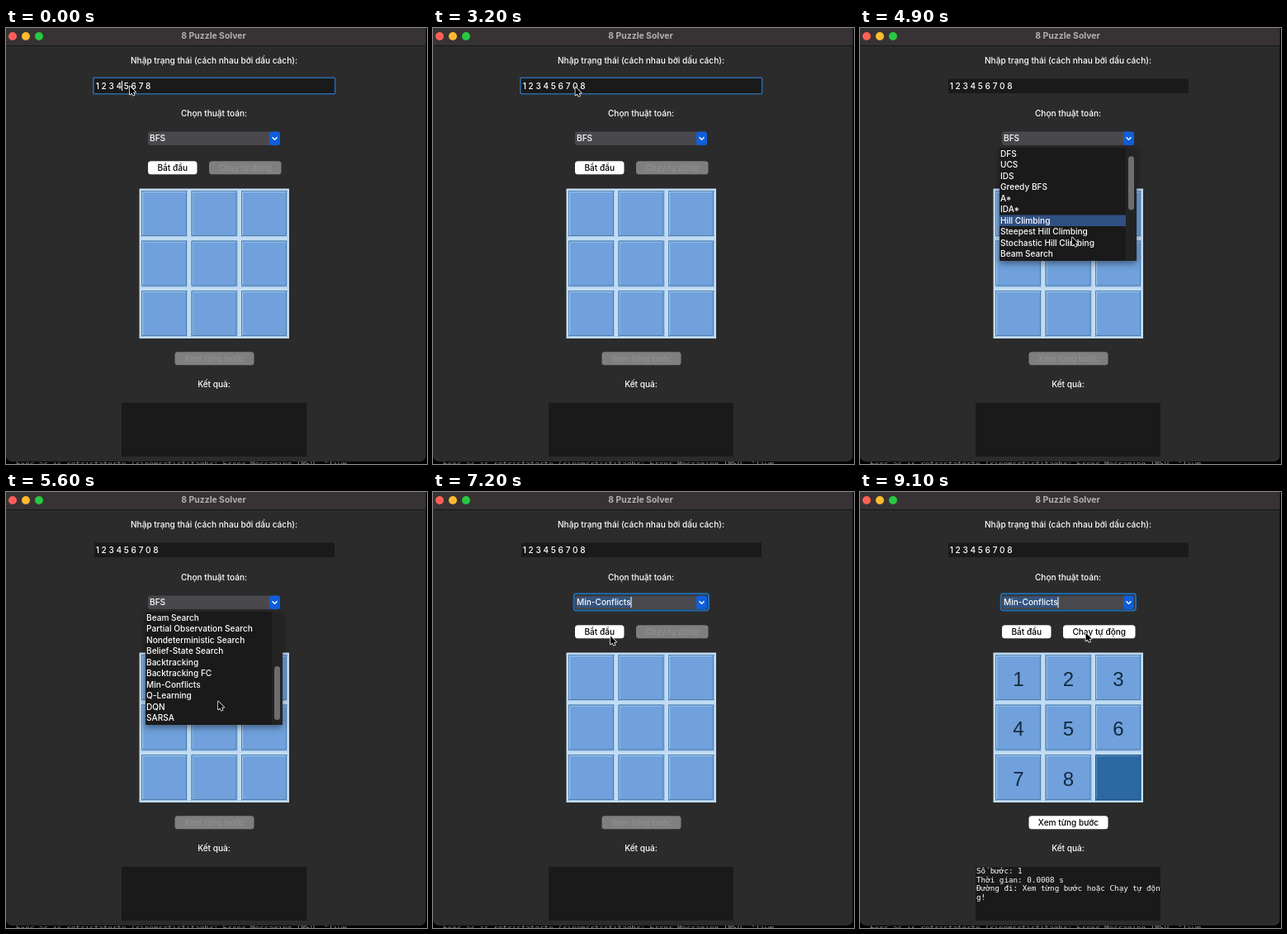
An HTML page with a canvas that plays this animation: 510x528 px, repeating every 9500 ms.

```html
<!DOCTYPE html>
<html lang="vi">
<head>
<meta charset="utf-8">
<title>8 Puzzle Solver</title>
<style>
html, body { margin: 0; width: 100%; height: 100%; overflow: hidden; background: #000; }
canvas { display: block; }
</style>
</head>
<body>
<canvas id="stage" width="510" height="528"></canvas>
<script>
const screen2d = document.getElementById('stage').getContext('2d');
const layer = document.createElement('canvas');
layer.width = 510;
layer.height = 528;
const layer2d = layer.getContext('2d');
let ctx = screen2d;

const UI = '500 10.1px Inter, sans-serif';
const MONO = '9.25px "DejaVu Sans Mono", monospace';
const LOOP = 9500;
const OPEN = 4100, CHOSEN = 6300, SOLVED = 7400, MOVED = 8300;

const algorithms = ['BFS', 'DFS', 'UCS', 'IDS', 'Greedy BFS', 'A*', 'IDA*', 'Hill Climbing',
  'Steepest Hill Climbing', 'Stochastic Hill Climbing', 'Beam Search',
  'Partial Observation Search', 'Nondeterministic Search', 'Belief-State Search',
  'Backtracking', 'Backtracking FC', 'Min-Conflicts', 'Q-Learning', 'DQN', 'SARSA'];
const report = ['Số bước: 1', 'Thời gian: 0.0008 s',
  'Đường đi: Xem từng bước hoặc Chạy tự độn', 'g!'];

// Pointer stops: time, x, y
const stops = [[0, 150, 70.5], [400, 150, 70.5], [1000, 171.5, 70.5], [1200, 172.5, 71.5],
  [3200, 172.5, 71.5], [3800, 327, 133.5], [4200, 327, 133.5], [4500, 257, 253.5],
  [5600, 257, 253.5], [6100, 239, 233.5], [6300, 239, 233.5], [7000, 215, 174.5],
  [7400, 215, 174.5], [8100, 273.5, 170.5], [LOOP, 273.5, 170.5]];

function pointerAt(t) {
  const i = stops.findIndex(s => s[0] > t);
  const [t0, x0, y0] = stops[i - 1], [t1, x1, y1] = stops[i];
  const p = (t - t0) / (t1 - t0), e = p * p * (3 - 2 * p);
  return [x0 + (x1 - x0) * e, y0 + (y1 - y0) * e];
}

function box(x, y, w, h, fill, r = 0) {
  ctx.fillStyle = fill;
  ctx.beginPath();
  ctx.roundRect(x, y, w, h, r);
  ctx.fill();
}

function outline(x, y, w, h, color, width = 1, r = 0) {
  ctx.strokeStyle = color;
  ctx.lineWidth = width;
  ctx.beginPath();
  ctx.roundRect(x, y, w, h, r);
  ctx.stroke();
}

function text(s, x, y, color = '#fff', align = 'left', font = UI) {
  ctx.font = font;
  ctx.fillStyle = color;
  ctx.textAlign = align;
  ctx.fillText(s, x, y);
}

function button(label, x, y, w, enabled) {
  box(x, y, w, 16, enabled ? '#fff' : '#7f7f7f', 3.5);
  text(label, x + w / 2, y + 11.3, enabled ? '#000' : '#8f8f8f', 'center');
}

function drawWindow() {
  box(0, 0, 510, 528, '#000');
  text('Exec as is retristatorte (rinemsrtistitagbr: Error Messaging IMSP  "Tiwm', 12, 531,
    '#8a8a8a', 'left', MONO);
  box(0, 0, 508.5, 525, '#2b2b2b', [0, 0, 7, 7]);
  box(0, 0, 508.5, 21, '#373334');
  box(0, 21, 508.5, 1, '#161616');
  ['#ff5f57', '#febc2e', '#28c840'].forEach((c, i) => box(3 + 16 * i, 5, 10, 10, c, 5));
  text('8 Puzzle Solver', 251.5, 12.7, '#b3b0b1', 'center', 'bold 10.4px Inter, sans-serif');
  text('Nhập trạng thái (cách nhau bởi dấu cách):', 252, 43, '#fff', 'center');
  text('Chọn thuật toán:', 252, 106.5, '#fff', 'center');
  text('Kết quả:', 252, 435, '#fff', 'center');
}

function drawEntry(t) {
  const tail = t < 2500 ? '8' : t < 2800 ? '08' : '0 8';
  const value = '1 2 3 4 5 6 7 ' + tail;
  box(107, 61.5, 291, 17.5, '#1a1a1a');
  text(value, 108.7, 73.8);
  if (t >= OPEN) return;
  outline(105.8, 60.3, 292.8, 19.4, '#2e67a9', 1.5, 1);
  if ((t + 100) % 900 < 600) {
    const at = t < 1700 ? 7 : 13 + tail.length;
    box(Math.round(108.7 + ctx.measureText(value.slice(0, at)).width), 64, 1, 12, '#fff');
  }
}

function drawCombo(t) {
  const chosen = t >= CHOSEN;
  if (chosen) outline(170.7, 123.3, 163.3, 20.2, '#1f6db4', 2, 3);
  box(172, 125.5, 160, 16.5, '#49484d', 3);
  if (chosen) box(174, 127, 66, 13, '#34547f');
  box(319, 125.5, 13, 16.5, '#0f5edb', 3);
  ctx.strokeStyle = '#fff';
  ctx.lineWidth = 1.4;
  ctx.beginPath();
  ctx.moveTo(322.5, 132.3);
  ctx.lineTo(325.5, 135.3);
  ctx.lineTo(328.5, 132.3);
  ctx.stroke();
  text(chosen ? 'Min-Conflicts' : 'BFS', 174, 137.3);
  if (chosen && t % 900 < 600) box(239.5, 127, 1, 13, '#fff');
}

function drawBoard(t) {
  const cells = t < SOLVED ? '         ' : t < MOVED ? '1234567 8' : '12345678 ';
  box(161.5, 194.5, 181.5, 181.5, '#c1dcf3');
  [...cells].forEach((n, i) => {
    const x = 164 + i % 3 * 60.5, y = 197 + Math.floor(i / 3) * 60.5;
    const blank = t >= SOLVED && n === ' ';
    box(x, y, 56, 56, blank ? '#2c69a2' : '#70a1dc');
    outline(x + 1.5, y + 1.5, 54, 54, blank ? '#5d93c4' : '#a9cbed');
    outline(x + .5, y + .5, 54, 54, blank ? '#1f5283' : '#4b7cab');
    text(n, x + 28, y + 37.5, '#152a40', 'center', '24px "Liberation Sans", Arial, sans-serif');
  });
}

function drawList(scroll, hover) {
  ctx.shadowColor = 'rgba(0,0,0,.45)';
  ctx.shadowBlur = 8;
  ctx.shadowOffsetY = 3;
  box(169, 145, 166, 137, '#1a1a1a', 1);
  ctx.shadowColor = 'transparent';
  box(322, 145, 13, 137, '#232323');
  algorithms.slice(scroll, scroll + 10).forEach((name, i) => {
    const y = 145.5 + 13.5 * i;
    if (scroll + i === hover) box(169, y, 153, 13.5, '#2f5081');
    text(name, 170, y + 10.2);
  });
  box(325, 149 + 6.2 * scroll, 7, 65, '#6d6d6d', 3.5);
}

// The list is painted on its own layer so that it fades as a whole
function showList(t, pointerY) {
  if (t < OPEN || t >= CHOSEN + 200) return;
  const scroll = t < 4900 ? 0 : [1, 4, 8, 10][Math.min(3, (t - 4900) / 100)];
  const row = Math.max(0, Math.floor((pointerY - 146) / 13.5)) + (t > 5600 ? 10 : 0);
  ctx = layer2d;
  ctx.clearRect(0, 0, 510, 528);
  drawList(scroll, t < CHOSEN ? row : -1);
  ctx = screen2d;
  ctx.globalAlpha = t < CHOSEN ? 1 : t < CHOSEN + 100 ? .6 : .2;
  ctx.drawImage(layer, 0, 0);
  ctx.globalAlpha = 1;
}

function drawPointer(x, y) {
  ctx.save();
  ctx.translate(x, y);
  ctx.scale(.84, .84);
  const arrow = new Path2D('M0 0V12L2.8 9.4L4.6 13.4L6.6 12.5L4.9 8.7H8.6Z');
  ctx.lineJoin = 'round';
  ctx.strokeStyle = '#fff';
  ctx.lineWidth = 1.8;
  ctx.stroke(arrow);
  ctx.fillStyle = '#000';
  ctx.fill(arrow);
  ctx.restore();
}

function draw(t) {
  const [x, y] = pointerAt(t);
  const solved = t >= SOLVED;
  drawWindow();
  drawEntry(t);
  drawCombo(t);
  button('Bắt đầu', 172, 161.2, 59.5, true);
  button('Chạy tự động', 246, 161.2, 87.5, solved);
  drawBoard(t);
  button('Xem từng bước', 204.5, 392.2, 96, solved);
  box(140, 454, 224, 65, '#1a1a1a');
  if (solved) report.forEach((line, i) => text(line, 141, 462.3 + 10.4 * i, '#fff', 'left', MONO));
  showList(t, y);
  drawPointer(x, y);
}

const start = performance.now();
function tick() {
  const t = (performance.now() - start) % LOOP;
  draw(Math.floor(t / 100) * 100);
  requestAnimationFrame(tick);
}
tick();
</script>
</body>
</html>
```
